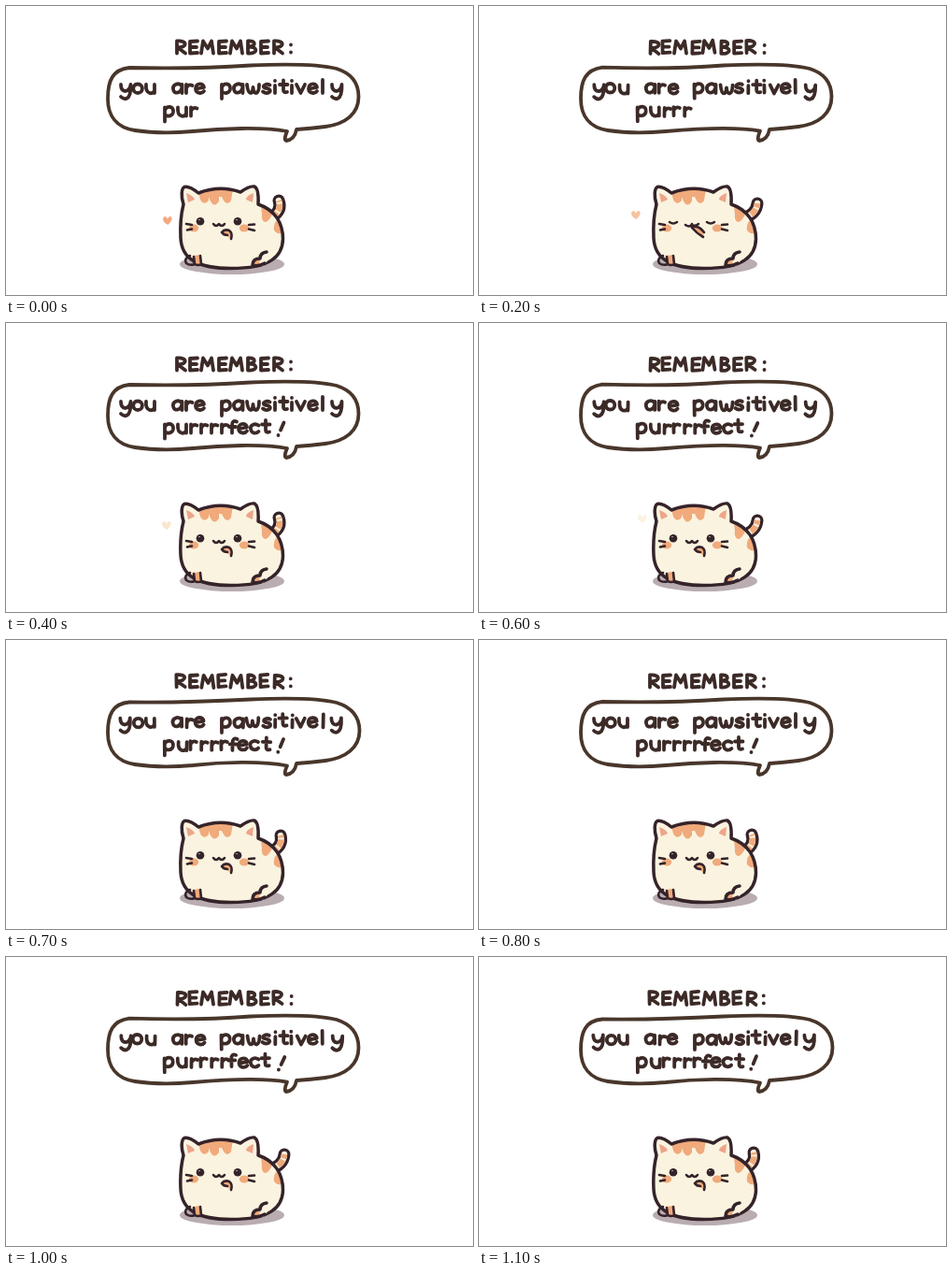
An HTML page for the animation above (1200 ms loop, 500 by 309 pixels).

```html
<!DOCTYPE html>
<html lang="en">
<head>
<meta charset="utf-8">
<title>Pawsitive cat</title>
<style>
  html, body { margin: 0; width: 100%; height: 100%; overflow: hidden; background: #fff; }
  svg { display: block; width: 100vw; height: 100vh; }
  .line { fill: none; stroke: #35232a; stroke-width: 3.5; stroke-linecap: round; stroke-linejoin: round; }
  .thin { stroke-width: 2.6; }
  .ink { stroke: #3c2a27; stroke-width: 3.8; }
  .bubble { stroke: #49362b; stroke-width: 3.8; }
  .cream { fill: #faf3df; }
  .orange { fill: #f0aa7b; }
  .pink { fill: #eda58b; }
  .dark { fill: #35232a; }
</style>
</head>
<body>
<svg viewBox="0 0 500 309" role="img" aria-label="Remember: you are pawsitively purrrrfect!">
  <defs>
    <path id="body" d="M190 212C187 203 188 195 191 193.5Q196 192 206 200Q229 191 251 199Q261 192 266 193Q271 196 270 212C288 218 296.5 232 296.5 249C296 268 283 280.5 241 280.5C206 280.5 188 271 187 248Q186 228 190 212Z"/>
    <clipPath id="skin"><use href="#body"/></clipPath>
  </defs>

  <g id="text"></g>
  <path id="bubble" class="line bubble"/>
  <path id="heart" d="M0 5C-7 1-5-5-2-4Q0-4 0-1Q2-5 4-3C6-1 4 2 0 5Z"/>

  <ellipse cx="242" cy="276" rx="56" ry="11" fill="#b9adb1"/>
  <g fill="none" stroke-linecap="round">
    <path class="tail" stroke="#35232a" stroke-width="13"/>
    <path class="tail" stroke="#faf3df" stroke-width="6.4"/>
    <path class="tail" stroke="#f0aa7b" stroke-width="6.4" stroke-linecap="butt" stroke-dasharray="8 2"/>
  </g>

  <g clip-path="url(#skin)">
    <use href="#body" class="cream"/>
    <path class="orange" d="M205 195H243L241 208Q237 214 233 208L231 204L228 204V209Q223 216 219 209L217 204V208Q212 214 208 207ZM273 214L286 220Q283 229 278 231Q273 230 274 223ZM289 230L299 234V243Q291 245 287 240Q286 234 289 230Z"/>
    <path class="pink" d="M193 200Q201 203 202 207L195 210ZM265 200Q257 203 257 207L264 210Z"/>
    <ellipse class="orange" cx="201" cy="237.5" rx="5.2" ry="4"/>
    <ellipse class="orange" cx="255" cy="237.5" rx="5.2" ry="4"/>
  </g>
  <use href="#body" class="line"/>
  <path class="line thin" d="M193 233L199 234M194 239.5L199 238.5M260 234L266 233.5M260 238.5L266 240"/>

  <path class="orange" d="M200 267L208 266L209 276L202 277Z"/>
  <path class="line thin" d="M197 267Q190 270 193 275Q197 278 202 276L201 268M202 276Q206 278 209 276L208 267"/>
  <path class="cream" d="M278 264L272 270L264 277L275 278L284 268Z"/>
  <path class="orange" d="M272 271Q264 271 264 277L271 277Z"/>
  <path class="line" d="M279 263Q272 264 272 270Q264 270 264 277Q270 279 277 275"/>

  <g id="awake">
    <g class="dark"><circle cx="208" cy="230.3" r="4.3"/><circle cx="248" cy="230.3" r="4.3"/></g>
    <g fill="#fff"><circle cx="207" cy="228.6" r=".7"/><circle cx="247" cy="228.6" r=".7"/></g>
    <path class="line thin" d="M222 233Q225 237 228 233Q231 237 234 233"/>
    <path class="orange" d="M231 242Q236 236 242 243L241 249Z"/>
    <path class="line thin" d="M237 245Q233 245 231 242Q234 238 239 240Q243 243 241 249"/>
  </g>
  <g id="blink">
    <path class="line thin" d="M204 231Q208 234 212 231M244 231Q248 234 252 231M221 234Q225 237 228 234Q231 236 235 233"/>
    <path class="orange" d="M228 237Q234 233 239 239L241 247Q235 246 228 237Z"/>
    <path class="line thin" d="M228 233V237Q233 243 240 247M230 236Q236 235 241 242"/>
  </g>
</svg>
<script>
const $ = id => document.getElementById(id);
const NS = "http://www.w3.org/2000/svg";
const STEP = 100, STEPS = 12;

// Stroke lettering, baseline at 0.
const glyphs = {
  R: "M0-13V0M0-13C12-14 11-6 1-6L9 0",
  E: "M8-13L0-12.5V0L8-.5M0-6.5H7",
  M: "M0 0L2-13L7-5L11-13L13 0",
  B: "M0-13V0M0-13C9-14 9-7 1-7C11-7 11 1 0 0",
  ":": "M0-9v.1M0-1v.1",
  y: "M0-9Q0-2 5-2Q10-3 10.5-9Q11 4 6 6Q3 7 0 4",
  o: "M5-9.5C-1.5-9.5-1 0 5 0C11.5 0 11.5-9.5 5-9.5Z",
  u: "M0-9C-1 2 8 2 9-3M9-9V0",
  a: "M9-7.5C6-12-1-9 0-4C1 2 8 0 9-5M9.5-9V0",
  r: "M0-9V0M0-5Q2-10 6.5-8",
  e: "M1-4.5L9-6C9-11 0-11 0-5C0 1 7 1 9-2",
  p: "M0-9V6M0-6C2-11 10-11 9-4C8 1 2 1 0-2",
  w: "M0-9Q1 0 4 0Q6 0 6.5-6Q7 0 10 0Q13-1 13-9",
  s: "M7.5-8.5C4-11-2-7 2-5.5C6-5 10-3 6.5-.5Q3 1 0-1.5",
  i: "M0-8V0M0-13v.1",
  t: "M4-13.5V-3Q4 0 8-1M0-9H8.5",
  v: "M0-9L4.5 0L9-9",
  l: "M0-14V0",
  f: "M8-12Q3-14 3-8V0M0-6.5H7",
  c: "M8.5-8C4-11-1-8 0-4C1 1 6 1 8.5-1.5",
  "!": "M6.5-11L3-3M.5 2.5v.1"
};

const lines = [
  ["REMEMBER:", 50.5, [183, 197, 209, 228, 240, 259, 273, 287, 305]],
  ["youarepawsitively", 93, [123, 136, 150, 179, 193, 203, 231, 244, 258, 275, 288, 293, 306, 311, 324, 339, 349]],
  ["purrrrfect!", 117.5, [170, 184, 198, 209, 220, 231, 239, 249, 262, 274, 291]]
];

const letters = lines.flatMap(([word, y, xs], row) => [...word].map((ch, i) => {
  const el = document.createElementNS(NS, "path");
  el.setAttribute("d", glyphs[ch]);
  el.setAttribute("class", "line ink");
  $("text").append(el);
  return { el, x: xs[i], y, row, i };
}));

const typed = [3, 4, 5, 8, 11];
const tails = ["M284 226Q296 219 292 208", "M284 227Q297 220 294 209", "M282 227Q297 223 298 211"];
const heartPath = [[173, 229], [170, 226], [168, 223], [169, 219], [172, 216], [174, 212], [175, 209]];
const heartInk = ["#f3a982", "#f4b591", "#f6c19f", "#f9d5b6", "#fbe5cc", "#fcecd7", "#fcf2df"];

const bubblePath = pose => {
  const r = pose === 1 ? 378.5 : 377.5, d = [0, .5, -.4][pose];
  return `M132 ${66 + d}C175 67 225 ${66 - d} 262 63.5C298 62 334 62 354 67` +
    `C370 72 ${r} 82 ${r} 97C${r} 115 364 126 342 129Q326 131 311 132` +
    `Q309 143 300 144Q297 143 301 ${134 + d}C275 129 230 ${131 - d} 200 134` +
    `Q165 137 138 133C118 130 109 117 109 99C109 80 114 68 132 ${66 + d}Z`;
};

function draw(step) {
  const pose = [0, 1, 2, 1][step % 4];
  const shown = typed[Math.min(step, 4)];
  for (const { el, x, y, row, i } of letters) {
    const n = pose ? Math.sin(i * 2.3 + pose * 4 + row) : 0;
    el.setAttribute("transform", `translate(${x + n * .5} ${y + n * .4}) rotate(${n * 1.5})`);
    el.style.display = row === 2 && i >= shown ? "none" : "";
  }
  $("bubble").setAttribute("d", bubblePath(pose));
  document.querySelectorAll(".tail").forEach(el => el.setAttribute("d", tails[pose]));

  const blink = step === 2 || step === 3;
  $("awake").style.display = blink ? "none" : "";
  $("blink").style.display = blink ? "" : "none";

  const at = heartPath[step];
  $("heart").style.display = at ? "" : "none";
  if (at) {
    $("heart").setAttribute("transform", `translate(${at}) rotate(${step % 2 ? 6 : -6})`);
    $("heart").setAttribute("fill", heartInk[step]);
  }
}

const start = performance.now();
let last = 0;
function tick() {
  const step = Math.floor((performance.now() - start) / STEP) % STEPS;
  if (step !== last) draw(last = step);
  requestAnimationFrame(tick);
}
draw(0);
requestAnimationFrame(tick);
</script>
</body>
</html>
```
